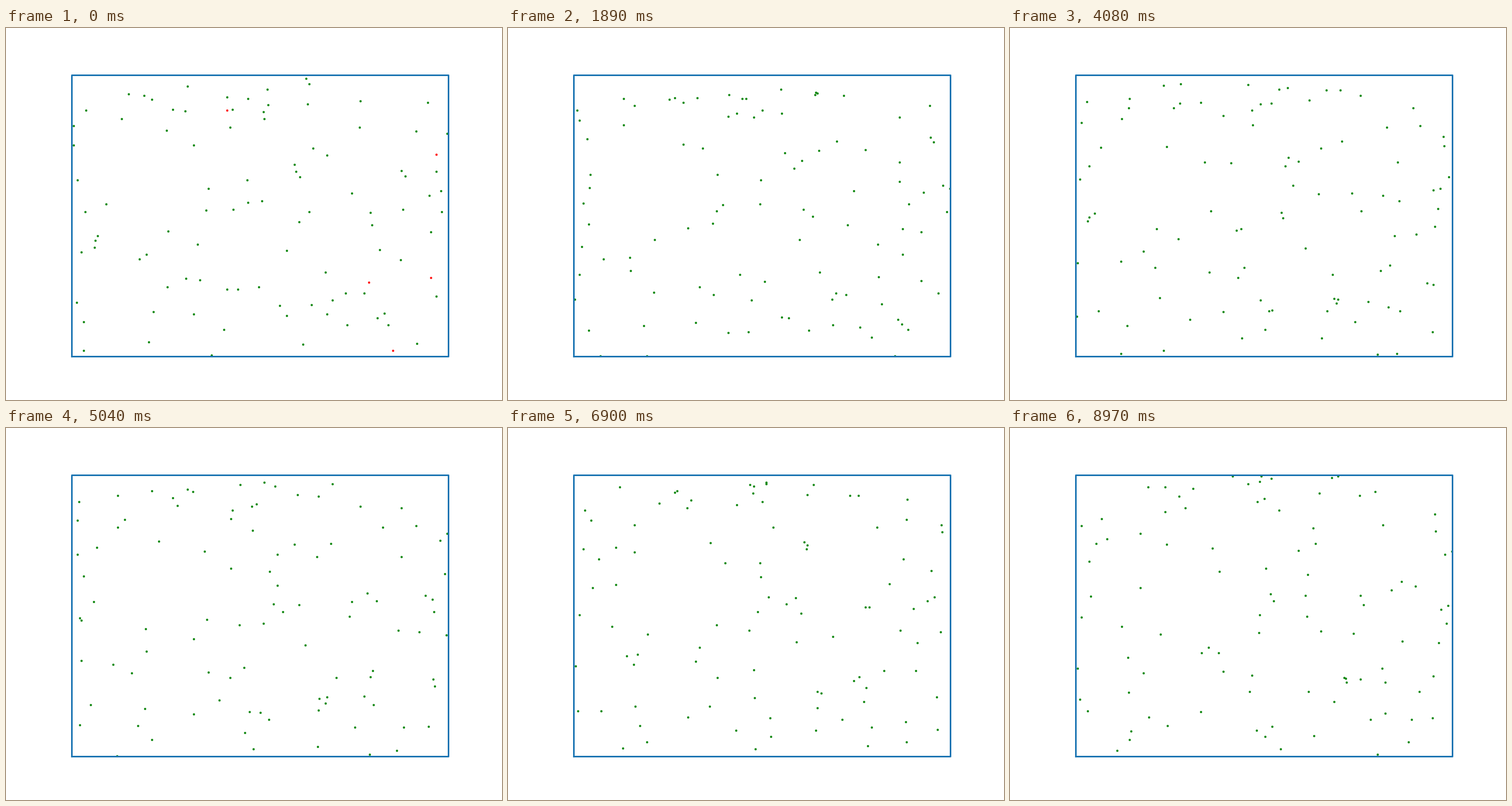
Write a matplotlib script that moves like this. It is 640 px wide and 480 px high and loops after 9 s.

```python
import numpy as np
import matplotlib.pyplot as plt
from matplotlib.animation import FuncAnimation

FRAMES, INTERVAL = 300, 30
SIZE = 100
PEOPLE = 100
MOVE_CHANCE = 0.34
ILL_AT_START = [(41.2, 87.6), (96.7, 71.9), (78.8, 26.4), (95.2, 28.0), (85.2, 2.1)]
DIRECTIONS = np.array([(1, 0), (-1, 0), (0, 1), (0, -1)])


def random_walk(start, rng):
    """Unit steps in four directions; steps that leave the box are refused."""
    path = [start]
    for _ in range(FRAMES - 1):
        here = path[-1]
        moving = rng.random(len(here)) < MOVE_CHANCE
        there = here + DIRECTIONS[rng.integers(4, size=len(here))]
        inside = ((there >= 0) & (there <= SIZE)).all(axis=1)
        path.append(np.where((moving & inside)[:, None], there, here))
    return path


rng = np.random.default_rng(7)
ill_count = len(ILL_AT_START)
others = rng.uniform(0, SIZE, (PEOPLE - ill_count, 2))
path = random_walk(np.vstack([ILL_AT_START, others]), rng)
recovery = np.zeros(PEOPLE, dtype=int)
recovery[:ill_count] = rng.integers(10, 60, ill_count)

fig, ax = plt.subplots(figsize=(6.4, 4.8), dpi=100, facecolor="white")
ax.set_position([0.125, 0.11, 0.775, 0.77])
ax.set(xlim=(-1, SIZE + 1), ylim=(-1, SIZE + 1))
ax.axis("off")
ax.plot([0, SIZE, SIZE, 0, 0], [0, 0, SIZE, SIZE, 0], color="C0", lw=1.5, zorder=2)


def dots(color):
    return ax.plot([], [], "o", color=color, ms=1, mew=1, zorder=1)[0]


healthy, ill = dots("green"), dots("red")


def update(i):
    sick = recovery > i
    healthy.set_data(*path[i][~sick].T)
    ill.set_data(*path[i][sick].T)
    return healthy, ill


anim = FuncAnimation(fig, update, frames=FRAMES, interval=INTERVAL,
                     repeat=True, repeat_delay=0)
plt.show()
```
